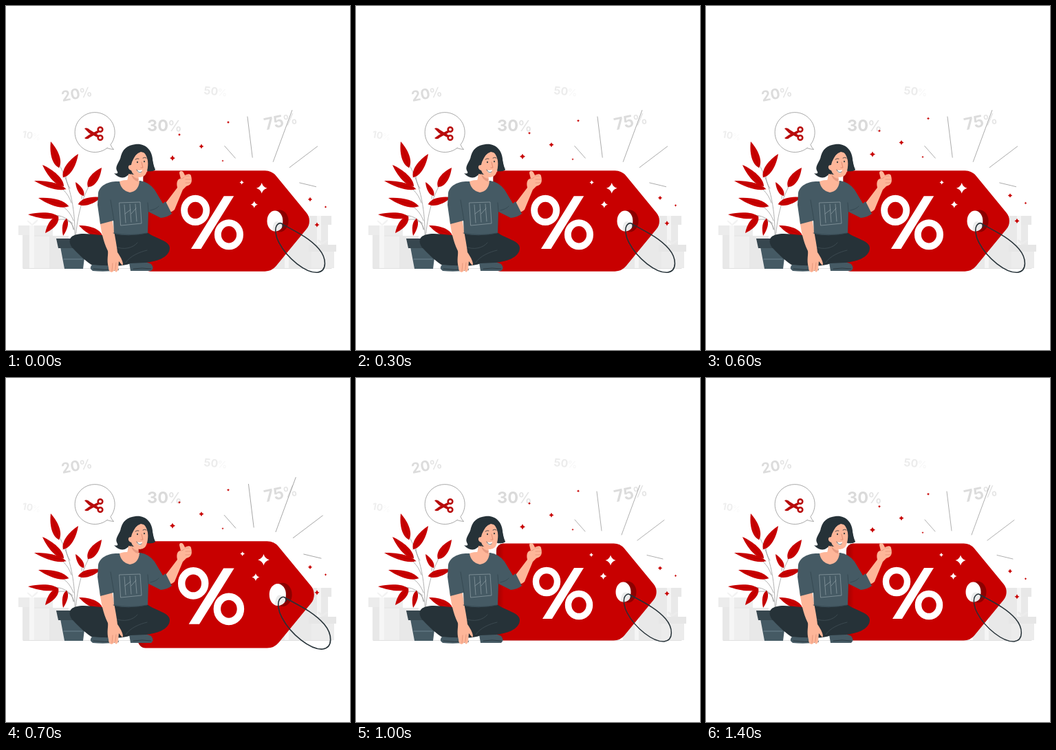
Write an HTML page with a canvas that moves like this. It is 500 by 500 pixels and loops after 1.5 s.

```html
<!DOCTYPE html>
<html lang="en">
<head>
<meta charset="utf-8">
<title>Discount tag</title>
<style>
  html, body { margin: 0; width: 100%; height: 100%; overflow: hidden; background: #fff; }
  canvas { display: block; width: 500px; height: 500px; }
</style>
</head>
<body>
<canvas id="stage" width="500" height="500"></canvas>
<script>
const canvas = document.getElementById('stage');
const ctx = canvas.getContext('2d');
const LOOP = 1500, STEP = 100;
const RED = '#c80000', DARK = '#263238', SLATE = '#455a64', SKIN = '#feb699', WHITE = '#fff';

function fill(d, color) {
  ctx.fillStyle = color;
  ctx.fill(new Path2D(d));
}

function stroke(d, color, width = 1) {
  ctx.strokeStyle = color;
  ctx.lineWidth = width;
  ctx.stroke(new Path2D(d));
}

function ellipse(x, y, rx, ry, color, line = 0) {
  ctx.beginPath();
  ctx.ellipse(x, y, rx, ry, 0, 0, Math.PI * 2);
  if (line) {
    ctx.strokeStyle = color;
    ctx.lineWidth = line;
    ctx.stroke();
  } else {
    ctx.fillStyle = color;
    ctx.fill();
  }
}

function rect(x, y, w, h, color) {
  ctx.fillStyle = color;
  ctx.fillRect(x, y, w, h);
}

function sparkle(x, y, r, color) {
  const k = r * 0.22;
  ctx.beginPath();
  ctx.moveTo(x, y - r);
  ctx.quadraticCurveTo(x + k, y - k, x + r, y);
  ctx.quadraticCurveTo(x + k, y + k, x, y + r);
  ctx.quadraticCurveTo(x - k, y + k, x - r, y);
  ctx.quadraticCurveTo(x - k, y - k, x, y - r);
  ctx.fillStyle = color;
  ctx.fill();
}

function roundedPolygon(points, radii) {
  const n = points.length;
  ctx.beginPath();
  ctx.moveTo((points[0][0] + points[n - 1][0]) / 2, (points[0][1] + points[n - 1][1]) / 2);
  points.forEach((p, i) => ctx.arcTo(...p, ...points[(i + 1) % n], radii[i]));
  ctx.closePath();
}

function leaf(x0, y0, x1, y1, width) {
  const length = Math.hypot(x1 - x0, y1 - y0);
  ctx.save();
  ctx.translate(x0, y0);
  ctx.rotate(Math.atan2(y1 - y0, x1 - x0));
  const mid = length * 0.45;
  fill(`M0 0C${mid * 0.4} ${-width} ${mid * 1.4} ${-width * 0.8} ${length} 0
        C${mid * 1.4} ${width * 0.8} ${mid * 0.4} ${width} 0 0Z`, RED);
  stroke(`M0 0L${length * 0.85} 0`, '#a00000', 0.5);
  ctx.restore();
}

function discount(digits, x, y, size, degrees, color, signColor) {
  ctx.save();
  ctx.translate(x, y);
  ctx.rotate(degrees * Math.PI / 180);
  ctx.font = `700 ${size}px Inter, sans-serif`;
  ctx.fillStyle = color;
  ctx.fillText(digits, 0, 0);
  const offset = ctx.measureText(digits).width;
  ctx.font = `500 ${size * 0.9}px Inter, sans-serif`;
  ctx.fillStyle = signColor;
  ctx.fillText('%', offset - 1, 0);
  ctx.restore();
}

function drawBackdrop() {
  discount('20', 82, 139, 21, -11, '#dcdcdc', '#e3e3e3');
  discount('30', 205, 181.5, 23.5, 0, '#dadada', '#e3e3e3');
  discount('50', 287, 128, 16, 6, '#ececec', '#f7f7f7');
  discount('75', 377, 180.5, 24, -12, '#dcdcdc', '#e5e5e5');
  discount('10', 23, 191, 14, 10, '#eeeeee', '#fafafa');

  // Gifts on the left
  rect(24, 333, 44, 48, '#e8e8e8');
  rect(18, 319, 50, 14, '#ececec');
  rect(34, 319, 7, 62, '#f6f6f6');
  rect(41, 335, 22, 46, '#efefef');
  rect(63, 334, 28, 47, '#e8e8e8');
  fill('M38 319C27 312 30 308 38 317C47 306 51 311 38 319Z', '#f2f2f2');

  // Gifts on the right
  rect(388, 330, 48, 51, '#e9e9e9');
  rect(428, 318, 40, 63, '#e9e9e9');
  rect(424, 305, 49, 13, '#e8e8e8');
  rect(452, 305, 6, 76, '#f5f5f5');
  rect(444, 357, 33, 24, '#ececec');
  rect(440, 347, 40, 10, '#e6e6e6');
  rect(405, 330, 6, 51, '#f5f5f5');
  fill('M459 347C449 340 453 336 460 344C468 336 472 341 459 347Z', '#ececec');

  stroke('M25 381.5H473', '#d3d3d3', 0.7);
}

function drawTag(scale) {
  ctx.save();
  ctx.translate(325, 272);
  ctx.scale(scale, scale);
  ctx.translate(-325, -272);

  stroke(`M350 165L357 222M412.500 156L386 228M448 206.500L409 236
          M423 257.500L446 263M318 206L333 223`, '#6c6c6c', 0.55);

  roundedPolygon([[204, 240.5], [384, 240.5], [442, 311], [384, 381.5], [204, 381.5]], [10, 20, 18, 20, 10]);
  ctx.fillStyle = RED;
  ctx.fill();
  const shade = ctx.createLinearGradient(204, 0, 215, 0);
  shade.addColorStop(0, 'rgba(80,0,0,.35)');
  shade.addColorStop(1, 'rgba(80,0,0,0)');
  ctx.fillStyle = shade;
  ctx.fill();

  ellipse(277, 296, 15.500, 16.500, WHITE, 9.500);
  ellipse(324, 330, 15.500, 16.500, WHITE, 9.500);
  fill('M317 276H331L285 350H271Z', WHITE);

  sparkle(370, 265, 7.500, WHITE);
  sparkle(342, 257, 3, WHITE);
  sparkle(359.500, 288, 5, WHITE);

  ellipse(395, 311, 12.500, 15.500, '#8c0000');
  ellipse(388.500, 311, 11, 14.500, WHITE);
  fill('M385 324Q386 306 397 314L399 319Q396 325 389 325.500Z', '#ececec');
  stroke(`M399 320C402 315 396 312 392 316C387 321 390 334 394 341
          C406 364 432 384 448 383C462 381 461 363 450 350
          C436 334 416 325 398 315`, DARK, 1.5);
  ctx.restore();
}

function drawSparkles(rise) {
  const sparks = [
    [242, 221, 4], [252, 187, 2], [284, 204, 3.5], [323, 169, 2],
    [315, 225, 1.6], [442, 281, 3.2], [452, 318, 3.6], [464.5, 292, 1.8]
  ];
  for (const [x, y, r] of sparks) sparkle(x, y - rise, r, RED);
}

function drawBubble() {
  stroke('M147 206.500Q151 208 156.500 208.500Q153 205 152 201.500A29 29 0 1 0 147 206.500', '#707070', 0.6);
  const color = '#b80a0a';
  ellipse(137, 179.500, 3.3, 3.3, color, 2.600);
  ellipse(137, 191.500, 3.3, 3.3, color, 2.600);
  fill('M114 178Q118 176 122 180L135 188L133 191L121 185Z', color);
  fill('M114 192Q118 195 122 191L135 184L133 181L121 187Z', color);
}

function drawPlant() {
  stroke(`M100 338C101 300 95 262 76 228M101 338C104 300 112 278 121 261
          M95 286C90 271 80 263 70 258M93 265Q87 256 87 246
          M98 312C92 296 82 290 74 288M99 325C94 308 80 303 62 304
          M108 289L122 284M110 280L111 270M97 316Q87 306 72 312M98 325Q96 310 88 314`, '#8f8f8f', 0.7);
  leaf(77, 235, 65, 197, 8.5);
  leaf(83, 249, 105, 215, 8.5);
  leaf(84, 262, 53, 231, 8);
  leaf(87, 266, 41, 254, 6.5);
  leaf(119, 263, 139, 235, 9);
  leaf(113, 276, 101, 256, 5.5);
  leaf(105, 288, 139, 278, 7.5);
  leaf(91, 291, 47, 279, 7.5);
  leaf(76, 306, 32, 303, 6.5);
  leaf(76, 306, 57, 330, 7.5);
  leaf(88, 309, 83, 334, 5.5);
  leaf(140, 334, 106, 319, 8);
  fill('M79 350H116L112 382H85Z', SLATE);
  fill('M73 338H120L118 352H76Z', '#37474f');
  stroke('M84 368H111', '#78909c', 0.8);
}

function drawLegs() {
  fill('M125 376Q143 370 161 374L164 384Q144 387 126 385Q120 381 125 376Z', SLATE);
  fill('M179 373Q195 368 211 375Q216 381 211 385H181Z', SLATE);
  stroke('M127 382Q143 384 160 383M185 382Q198 380 211 382', DARK, 0.8);
  fill(`M151 330L205 329C219 339 238 341 238 352C237 367 217 371 204 373
        L181 374C170 379 154 378 124 376C112 368 104 359 96 351
        C87 337 97 331 113 331C126 331 140 334 151 334Z`, DARK);
  stroke('M160 350C170 355 185 352 191 344M174 373C181 363 193 358 205 355', '#46545b', 0.7);
}

function drawBody() {
  // Raised forearm with thumb
  fill(`M233 285L249 264C247 255 250 251 254 251L252 243
        C252 239 256 239 258 242L260 246Q268 242 269 247
        C271 255 270 260 262 262L257 267L245 296Q239 302 231 298Z`, SKIN);
  stroke('M260 247L266 247M261 252H269M261 257H268M253 251Q256 252 259 249', '#d78369', 0.6);

  // Resting arm and hand
  fill(`M136 310L154 307C157 329 161 347 162 358C167 365 172 375 169 377
        L164 371L163 383Q160 390 158 384L154 387Q149 387 149 380
        C146 369 149 361 148 356C141 342 138 325 136 310Z`, SKIN);
  stroke('M159 383L160 373M154 385L155 374', '#d78369', 0.6);

  fill(`M165 255C150 254 136 260 134 272L133 289L137 317L156 312L157 331
        Q180 336 206 330L207 299L225 308Q235 307 241 302L232 284
        L228 287L216 267Q208 256 195 254Z`, SLATE);
  stroke('M157 312L152 282M207 299L206 286M210 297Q219 295 222 291M156 330Q180 335 205 330', '#33464f', 0.8);
  fill('M165 255Q174 251 194 254Q193 269 180 271Q167 268 165 255Z', SKIN);

  stroke(`M165 286L195 285L197 316L167 319ZM172 289L174 315M180 288L182 314
          M188 288L190 313M173 302L181 296M182 302L189 294`, '#98a7ae', 0.65);
}

function drawHead() {
  fill(`M188 201C202 199 212 209 213 222C213 229 215 234 217 238
        Q211 242 206 239L190 246C184 249 181 247 177 246
        C171 252 163 250 157 243Q165 245 161 239
        C158 232 166 226 167 218Q171 203 188 201Z`, DARK);
  fill('M178 244L193 246L192 258Q182 263 176 255Z', SKIN);
  fill('M182 243Q186 251 193 251L192 255Q183 253 182 243Z', '#e79a80');
  fill(`M183 226Q187 215 196 212Q205 213 206 221C207 231 206 241 202 246
        Q195 252 187 246Q183 243 182 239C176 237 177 230 182 231Z`, SKIN);

  // Fringe and the strand beside the cheek
  fill('M180 232C184 227 185 218 195 210Q186 205 178 212Z', DARK);
  fill('M192 209C203 211 205 219 207 229Q208 236 205 240Q213 241 217 238C212 228 215 207 192 205Z', DARK);

  ellipse(191, 227, 0.9, 1.2, DARK);
  ellipse(201, 226, 0.9, 1.2, DARK);
  stroke('M188 223Q190 221 193 222M199 221Q202 219 204 221', DARK, 0.8);
  stroke('M197 227L199 235L196 235', '#d07961', 0.7);
  fill('M190 238Q194 240 198 238Q197 243 194 243Q191 242 190 238Z', WHITE);
  stroke('M190 238Q193 244 197 241', DARK, 0.7);
}

function draw(now) {
  const time = Math.floor((now % LOOP) / STEP) * STEP;
  // Two beats per loop, followed by a rest
  const distance = Math.min(Math.abs(time - 150), Math.abs(time - 750));
  const pulse = distance < 250 ? (1 + Math.cos(Math.PI * distance / 250)) / 2 : 0;
  const rise = 3.1 * (1 - Math.cos(2 * Math.PI * time / LOOP));

  ctx.fillStyle = WHITE;
  ctx.fillRect(0, 0, 500, 500);
  ctx.lineCap = ctx.lineJoin = 'round';
  drawBackdrop();
  drawTag(1 + 0.11 * pulse);
  drawSparkles(rise);
  drawBubble();
  drawPlant();
  drawLegs();
  drawBody();
  drawHead();
}

const start = performance.now();
function tick() {
  draw(performance.now() - start);
  requestAnimationFrame(tick);
}
tick();
</script>
</body>
</html>
```
